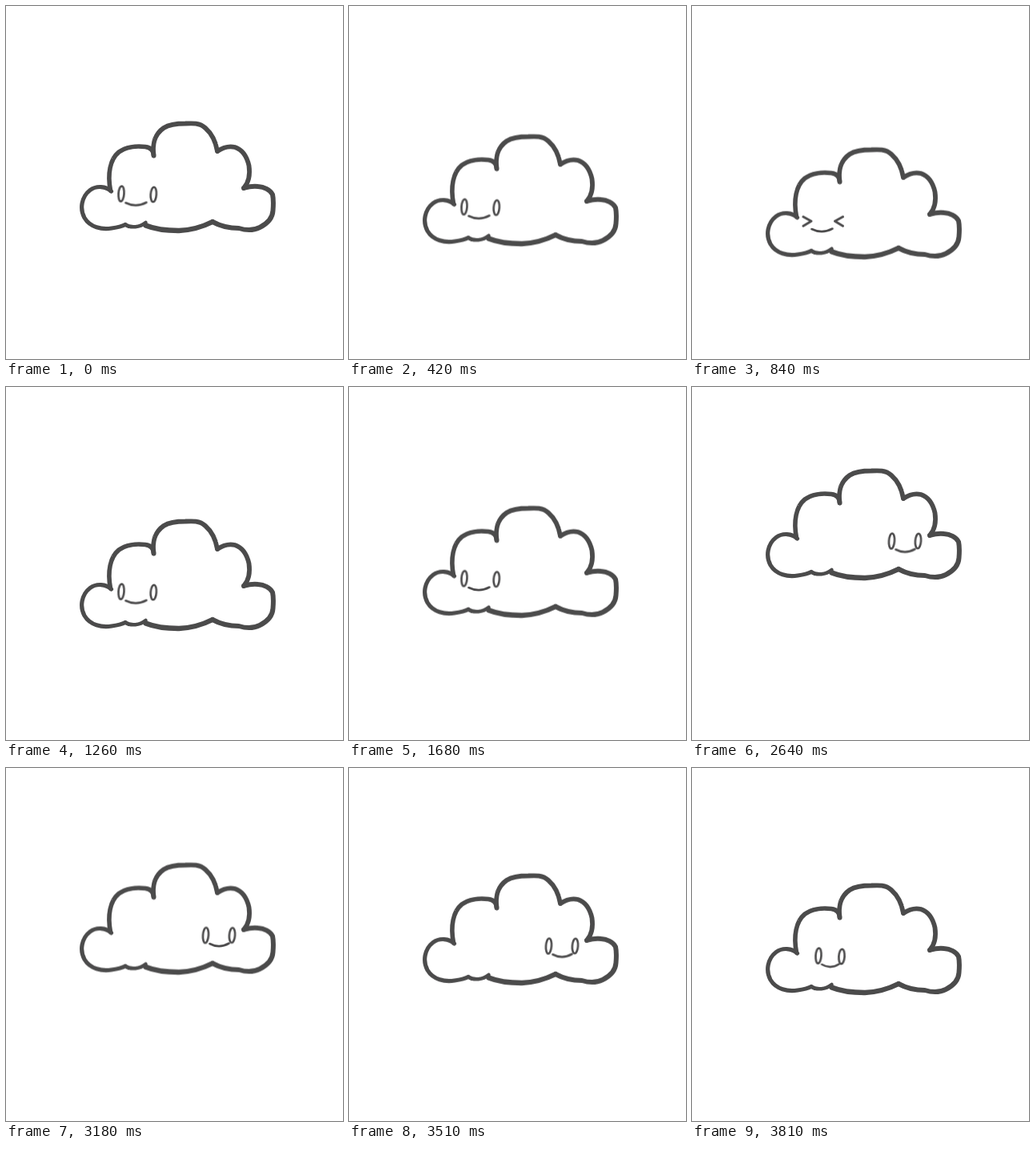
Recreate the animation shown at these times as an HTML page. Size 421x440 px, loop 3840 ms.

```html
<!DOCTYPE html>
<html lang="en">
<head>
<meta charset="utf-8">
<title>Drifting cloud</title>
<style>
  html, body { margin: 0; width: 100%; height: 100%; overflow: hidden; background: #fff; }
  svg { display: block; width: 100vw; height: 100vh; }
  path, ellipse { fill: none; stroke: #4c4b4c; stroke-linecap: round; stroke-linejoin: round; }
  #face path, #face ellipse { stroke-width: 2.6; vector-effect: non-scaling-stroke; }
  #face #squint path { stroke-width: 3; }
</style>
</head>
<body>
<svg viewBox="0 0 421 440">
  <defs>
    <filter id="brush" filterUnits="userSpaceOnUse" x="80" y="130" width="270" height="165">
      <feTurbulence type="fractalNoise" baseFrequency=".16" numOctaves="1" seed="4"/>
      <feDisplacementMap in="SourceGraphic" scale="1.8" xChannelSelector="R" yChannelSelector="G"/>
    </filter>
  </defs>
  <g id="cloud">
    <g filter="url(#brush)">
      <!-- left lobe -->
      <path stroke-width="5.200" d="M131.500 231C125 224.500 113 223.500 105 229.500C94 238 92 253 98 264C105 276 120 279 132 277C139 276 144 275 149 272.500"/>
      <!-- underside -->
      <path stroke-width="4.600" d="M149 272.500C156 277 167 276 174.500 270"/>
      <path stroke-width="6.400" d="M174.500 273.500C188 279 203 280 216 280C229 279.500 244 276 258 269"/>
      <!-- right lobe -->
      <path stroke-width="6" d="M258 269C268 274.500 279 277 291 277C299 279.500 309 280 317 276C326 271.500 333 264 333.500 255C334 249 334.500 242 333 235C330 229 322 225.500 315 225C308 224 302 225.500 297 227"/>
      <!-- upper lobes -->
      <path stroke-width="5.800" d="M297 227C304 219 305 209 303.500 199C301 188 295 179 286 176C278 174 270 177 264 181"/>
      <path stroke-width="5.800" d="M264 181C262 169 257 159 249 152C242 145.500 233 146 224 146.500C215 146.500 205 147 197 152C184 161 183 174 184.500 186.500"/>
      <path stroke-width="5.600" d="M184.500 186.500C184.500 180 181 176.500 174 175.500C162 174 149 176 141 182C130 191 126.500 209 130.500 230"/>
    </g>
    <g id="face">
      <g id="open">
        <g id="leftEye"><ellipse rx="3.500" ry="9.500" transform="rotate(4)"/></g>
        <g id="rightEye"><ellipse rx="3.600" ry="9.300" transform="rotate(4)"/></g>
      </g>
      <g id="squint">
        <path d="M139 230L149 235.500L139 241.500"/>
        <path d="M188.500 230L178.500 235.500L188.500 241.500"/>
      </g>
      <g id="mouth"><path d="M-13 0Q0 6.500 13 -.5"/></g>
    </g>
  </g>
</svg>
<script>
  const LOOP = 3840, TICK = 30;
  const SQUINT_START = 600, SQUINT_END = 1200;

  // Each row is [time, ...values]; motion is linear, held for one tick at a time.
  function play(id, rows, toStyle) {
    const frames = rows.map(([time, ...values], i) => {
      const next = i + 1 < rows.length ? rows[i + 1][0] : time + TICK;
      return {
        offset: time / LOOP,
        easing: `steps(${(next - time) / TICK}, end)`,
        ...toStyle(...values)
      };
    });
    document.getElementById(id).animate(frames, { duration: LOOP, iterations: Infinity });
  }

  const at = (x, y, scale = 1) => ({
    transform: `translate(${x}px, ${y}px) scale(${scale}, 1)`
  });
  const fade = opacity => ({ opacity });

  play('cloud', [[0, 0], [900, 35], [1800, 0], [2700, -45], [3810, 0], [LOOP, 0]], y => at(0, y));

  // The face rests on the left, slides right, then returns.
  const slide = (left, right, late) => [
    [0, ...left], [1800, ...left], [2100, ...right],
    [3540, ...right], [3810, ...late], [LOOP, ...left]
  ];
  play('leftEye', slide([144, 234], [249.5, 234], [158, 234]), at);
  play('rightEye', slide([184.3, 235], [282.5, 234], [187, 235]), at);
  play('mouth', slide([162.5, 245.3, 1], [266.5, 244.5, .93], [173, 244.8, .83]), at);

  const blink = (rest, shut) => [
    [0, rest], [SQUINT_START - TICK, rest], [SQUINT_START, shut],
    [SQUINT_END - TICK, shut], [SQUINT_END, rest], [LOOP, rest]
  ];
  play('open', blink(1, 0), fade);
  play('squint', blink(0, 1), fade);
</script>
</body>
</html>
```
